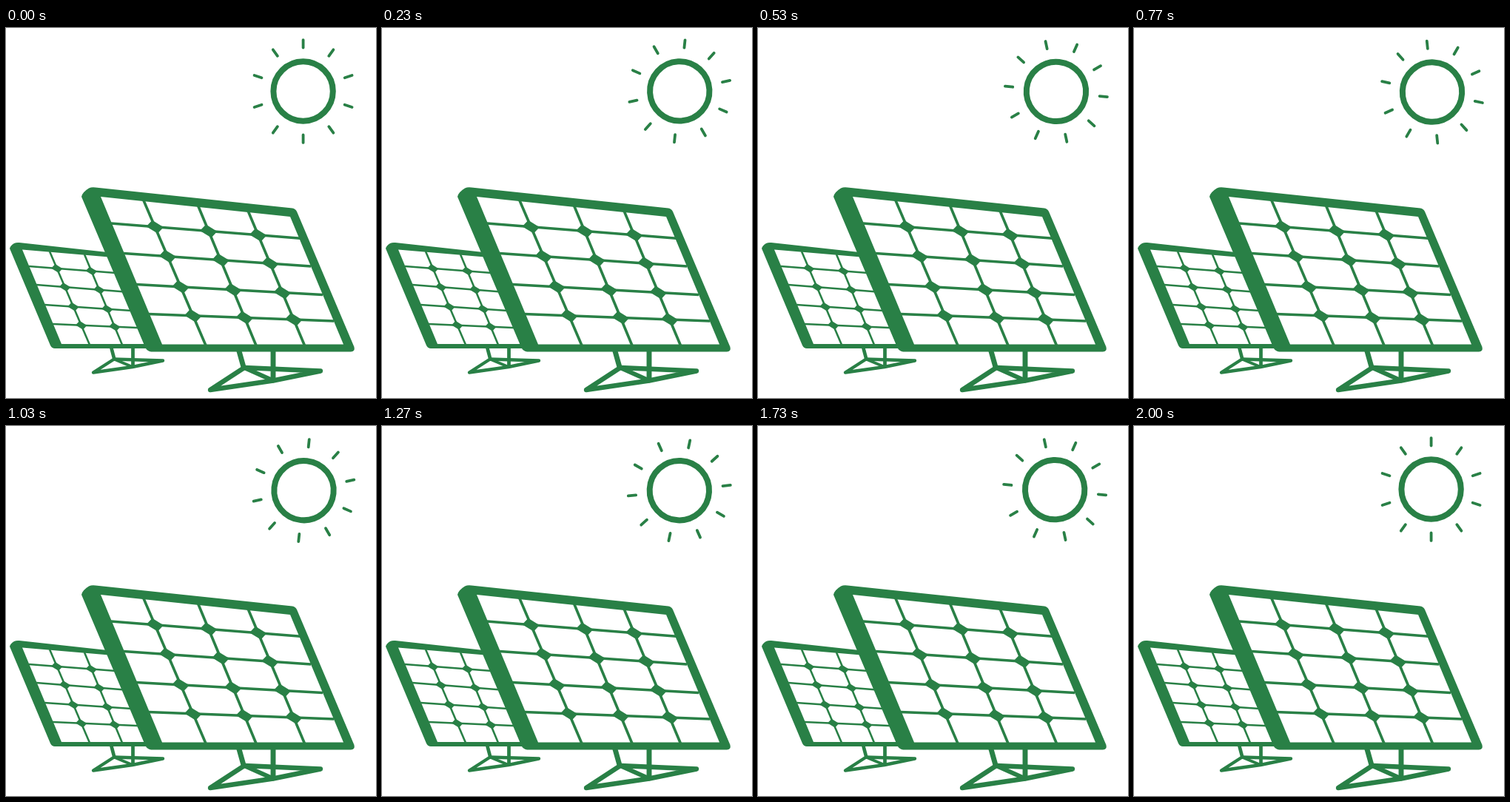
Write an HTML page that moves like this. It is 500x500 px and loops after 2.06 s.

```html
<!DOCTYPE html>
<html lang="en">
<head>
<meta charset="utf-8">
<title>Solar panels</title>
<style>
  html, body { margin: 0; width: 100%; height: 100%; overflow: hidden; background: #fff; }
  svg { display: block; width: 100%; height: 100%; }
</style>
</head>
<body>
<svg id="stage" viewBox="0 0 500 500" fill="none" stroke-linecap="round" stroke-linejoin="round"></svg>
<script>
const GREEN = '#298046';
const LOOP = 2060, STEPS = 60, FRAME_RATE = 30;
const PIVOT = [402.1, 86.3], SUN = [401.6, 85.5];
const stage = document.getElementById('stage');

function add(parent, tag, attrs) {
  const el = document.createElementNS('http://www.w3.org/2000/svg', tag);
  for (const key in attrs) el.setAttribute(key, attrs[key]);
  return parent.appendChild(el);
}

const fill = (d, color = GREEN) => add(stage, 'path', { d, fill: color });
const line = (d, width, cap = 'round') =>
  add(stage, 'path', { d, stroke: GREEN, 'stroke-width': width, 'stroke-linecap': cap });

// Crossing point of two segments given as [x1, y1, x2, y2].
function cross([ax, ay, bx, by], [cx, cy, dx, dy]) {
  const ux = bx - ax, uy = by - ay, vx = dx - cx, vy = dy - cy;
  const k = ((cx - ax) * vy - (cy - ay) * vx) / (ux * vy - uy * vx);
  return [ax + ux * k, ay + uy * k];
}

function panel({ outline, glass, rows, cols, width, node }) {
  fill(outline);
  fill(glass, '#fff');
  for (const [x1, y1, x2, y2] of [...rows, ...cols])
    line(`M${x1} ${y1}L${x2} ${y2}`, width, 'butt');
  for (const row of rows) for (const col of cols) {
    const [x, y] = cross(row, col);
    const a = node, b = node * 0.06, c = node * 0.34, d = node * 0.76;
    const diamond = fill(`M${x - a} ${y - b}L${x + c * -1} ${y - d}L${x + a} ${y + b}L${x + c} ${y + d}Z`);
    diamond.setAttribute('stroke', GREEN);
    diamond.setAttribute('stroke-width', 1.5);
  }
}

function stand(legs, base, strut, width) {
  line(legs, width * 1.08, 'butt');
  line(base, width);
  line(strut, width * 0.9);
}

// Rear panel
stand('M142 431L146.5 448M171.5 431V458',
  'M118 465.5L146 447.5L212 449.5L171 458Z', 'M146 447.5L171 458', 4.4);
panel({
  outline: 'M5 298Q6 294 11 291Q14 289.5 18 290L146 304L198 433H66Q62 433 60 429Z',
  glass: 'M22 299.5L145 310L196 427H75Z',
  rows: [[31, 322, 155, 331.5], [41, 347, 167, 357], [52, 374, 177, 382.5], [63, 400, 188, 405.5]],
  cols: [[59, 302, 113, 428], [106, 306, 157, 428]],
  width: 2.6, node: 6.5
});

// Front panel
stand('M314.5 435L321.5 460M361 435V476',
  'M276 489L322 459L425 463.5L361 476.5Z', 'M322 459L361 476.5', 6.4);
panel({
  outline: 'M102 228Q103 222 112 216.5Q116 214.5 121 215.5L387 243.5Q391 244 393 248' +
    'L470.5 431Q472 437 466 437.5H196Q190 437 187.5 430Z',
  glass: 'M128 228L384 255L456 427.5H211Z',
  rows: [[142, 264, 398, 284.2], [159, 304.5, 412, 322], [176, 346.5, 428, 360.5], [192, 386.5, 443, 396]],
  cols: [[185.5, 232, 270, 429], [259.5, 240, 338, 429], [327, 247, 403.5, 429]],
  width: 3.6, node: 10.5
});

// Sun
const sun = add(stage, 'g', { stroke: GREEN });
const [sx, sy] = SUN;
add(sun, 'circle', { cx: sx, cy: sy, r: 40.2, 'stroke-width': 8 });
for (let i = 0; i < 10; i++)
  add(sun, 'path', {
    d: `M${sx} ${sy - 59}V${sy - 69.4}`,
    'stroke-width': 3.8,
    transform: `rotate(${i * 36} ${sx} ${sy})`
  });

// One slightly off-centre turn, then a short rest.
function draw(ms) {
  const t = Math.floor((ms % LOOP) / 10) * 10;
  const step = Math.min(STEPS, Math.floor((t + 5) * FRAME_RATE / 1000));
  sun.setAttribute('transform', `rotate(${step * 360 / STEPS} ${PIVOT})`);
}

const start = performance.now();
function tick(now) {
  draw(Math.max(0, now - start));
  requestAnimationFrame(tick);
}
draw(0);
requestAnimationFrame(tick);
</script>
</body>
</html>
```
